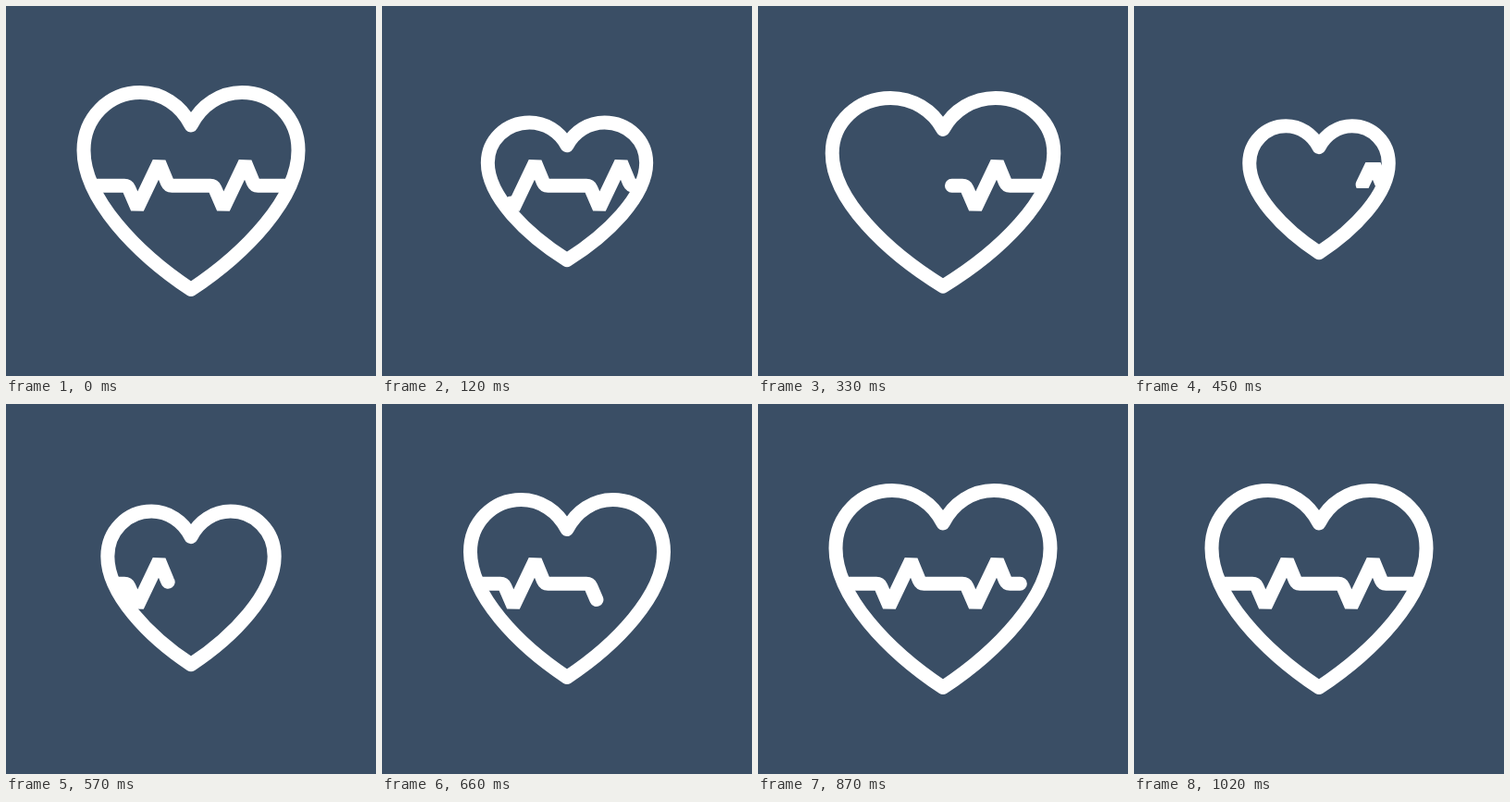
Recreate the animation shown at these times as an HTML page with a canvas. Size 400x400 px, loop 1290 ms.

```html
<!DOCTYPE html>
<html>
<head>
<meta charset="utf-8">
<style>
html, body { margin: 0; height: 100%; overflow: hidden; background: #3a4e65; }
canvas { display: block; }
</style>
</head>
<body>
<canvas id="stage" width="400" height="400"></canvas>
<script>
const ctx = document.getElementById('stage').getContext('2d');
const LOOP = 1290, STEP = 30, END = 1020, LENGTH = 342;

// Sharp peaks, rounded corners beside the level parts
const spike = 'q3.5 0 4.9 3.2l9.1 21l23.5 -49.2l9 21.8q1.4 3.2 4.9 3.2';
const pulse = new Path2D(`M92 194.3H128${spike}H221${spike}H308`);

const clamp = x => Math.min(1, Math.max(0, x));
const easeInOut = u => (1 - Math.cos(Math.PI * u)) / 2;
const easeOut = u => 1 - (1 - u) ** 2;

// time, x scale, y scale, vertical shift, easing towards this pose
const beats = [
  [0, 1, 1, 0],
  [140, .725, .682, .3, easeInOut],
  [278, 1.105, 1.015, 1.8, easeInOut],
  [485, .615, .615, -2, easeInOut],
  [840, 1, 1, 0, easeOut]
];

function heartPose(t) {
  let i = 1;
  while (i < beats.length - 1 && t > beats[i][0]) i++;
  const a = beats[i - 1], b = beats[i];
  const k = b[4](clamp((t - a[0]) / (b[0] - a[0])));
  return [1, 2, 3].map(j => a[j] + (b[j] - a[j]) * k);
}

// The outline scales, its stroke does not
function traceHeart([sx, sy, dy]) {
  ctx.save();
  ctx.translate(200, 200 + dy);
  ctx.scale(sx, sy);
  ctx.beginPath();
  ctx.moveTo(0, -71);
  ctx.bezierCurveTo(-11, -93, -32, -106.5, -55, -106.5);
  ctx.bezierCurveTo(-89, -106.5, -116, -79, -116, -44);
  ctx.bezierCurveTo(-116, 8, -59, 67.5, 0, 106.5);
  ctx.bezierCurveTo(59, 67.5, 116, 8, 116, -44);
  ctx.bezierCurveTo(116, -79, 89, -106.5, 55, -106.5);
  ctx.bezierCurveTo(32, -106.5, 11, -93, 0, -71);
  ctx.closePath();
  ctx.restore();
}

function strokePulse(offset) {
  ctx.setLineDash([LENGTH, LENGTH]);
  ctx.lineDashOffset = offset;
  ctx.stroke(pulse);
  ctx.setLineDash([]);
}

function draw(t) {
  ctx.fillStyle = '#3a4e65';
  ctx.fillRect(0, 0, 400, 400);
  ctx.strokeStyle = '#fff';
  ctx.lineWidth = 15;
  ctx.lineCap = 'round';

  const pose = heartPose(t);
  traceHeart(pose);
  ctx.save();
  ctx.clip();
  ctx.lineJoin = 'bevel';

  const drawn = LENGTH * easeOut(clamp((t - 420) / 625));
  if (t >= END) strokePulse(0);
  else if (drawn > 0) strokePulse(LENGTH - drawn);

  // The old trace leaves to the right and flattens near its end
  const erased = Math.max(0, (t - 17) * .573);
  if (erased < LENGTH - 40) {
    const flat = clamp((t - 390) / 60);
    ctx.beginPath();
    ctx.rect(0, 166 + 3 * flat, 400, 57 - 29 * flat);
    ctx.clip();
    strokePulse(-erased);
  }
  ctx.restore();

  ctx.lineJoin = 'round';
  traceHeart(pose);
  ctx.stroke();
}

const start = performance.now();
function tick() {
  const t = (performance.now() - start) % LOOP;
  draw(Math.min(END, Math.floor(t / STEP) * STEP));
  requestAnimationFrame(tick);
}
tick();
</script>
</body>
</html>
```
